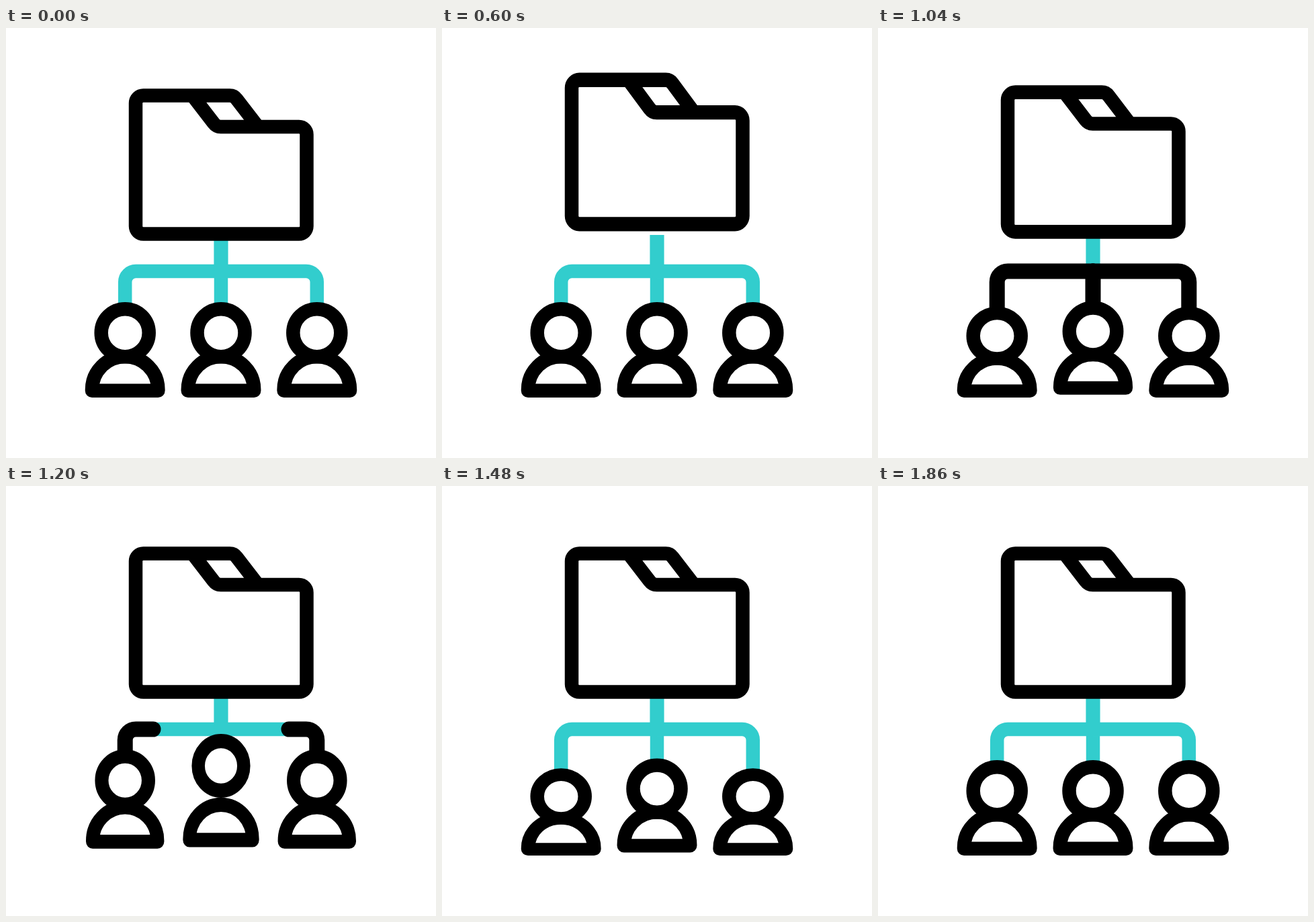
These frames come from a looping animation (640 by 640 pixels, 1960 ms). An HTML page:

```html
<!DOCTYPE html>
<html lang="en">
<head>
<meta charset="utf-8">
<title>Shared folder</title>
<style>
  html, body { margin: 0; height: 100%; overflow: hidden; background: #fff; }
  svg { display: block; width: 100vw; height: 100vh; }
  path, circle { fill: none; stroke: #000; stroke-width: 20.5; stroke-linejoin: round; }
  .wires path { stroke: #32cdcd; }
  .pulse path { stroke-width: 23; stroke-linecap: round; }
  .folder { stroke-linecap: round; }
  .person * { fill: #fff; }
</style>
</head>
<body>
<svg viewBox="0 0 640 640">
  <g class="wires"></g>
  <path class="folder" d="M277.4 100.5L309 141.5Q313.2 147 319.5 147H436a11.5 11.5 0 0 1 11.5 11.5V295a11.5 11.5 0 0 1-11.5 11.5H204.5a11.5 11.5 0 0 1-11.5-11.5V112a11.5 11.5 0 0 1 11.5-11.5H333Q339.4 100.5 343 105.5L375 147"/>
  <g class="pulse"></g>
  <g class="people"></g>
</svg>
<script>
const LOOP = 1960, MIDDLE = 320, SPACING = 142.8;
const FLOOR = 550, FOLDER_BASE = 306, WIRE_LENGTH = 250;
const SIDES = [-1, 0, 1];
const $ = selector => document.querySelector(selector);

function wire(side) {
  const x = MIDDLE + side * SPACING;
  const bend = side ? `V362H${x - side * 16}a16 16 0 0 ${side > 0 ? 1 : 0} ${side * 16} 16` : '';
  return `<path d="M${MIDDLE} 308${bend}V424"/>`;
}
$('.wires').innerHTML = $('.pulse').innerHTML = SIDES.map(wire).join('');

// Each person stands on the origin of its own group.
$('.people').innerHTML = SIDES.map(() => `<g class="person">
  <path d="M-49.2-10.3v-1.5a49.2 49.2 0 0 1 98.4 0v1.5z"/><circle cy="-96.3" r="35.5"/></g>`).join('');
const people = [...$('.people').children];

function ease(t, from, to) {
  const x = Math.min(1, Math.max(0, (t - from) / (to - from)));
  return x * x * (3 - 2 * x);
}
const bump = (t, from, peak, to) => ease(t, from, peak) - ease(t, peak, to);

// Crouch, leap, land flat, then one small rebound.
function hop(t, height) {
  return {
    lift: height * bump(t, 140, 300, 450) + 6 * bump(t, 520, 685, 885),
    tall: 1 - .07 * bump(t, 0, 115, 230) + .05 * bump(t, 200, 310, 430)
            - .088 * bump(t, 430, 515, 680) + .015 * bump(t, 600, 690, 890)
  };
}

function draw(t) {
  const { lift, tall } = hop(t - 260, 18);
  $('.folder').setAttribute('transform',
    `translate(0 ${FOLDER_BASE - lift}) scale(1 ${tall}) translate(0 ${-FOLDER_BASE})`);

  const front = WIRE_LENGTH * ease(t, 693, 970);
  const tail = WIRE_LENGTH * ease(t, 870, 1440);
  const pulse = $('.pulse').style;
  pulse.visibility = front > tail ? 'visible' : 'hidden';
  pulse.strokeDasharray = `${front - tail} 999`;
  pulse.strokeDashoffset = -tail;

  people.forEach((person, i) => {
    const side = SIDES[i], time = t - (side ? 970 : 850);
    const { lift, tall } = hop(time, 17);
    const wide = 1 - .05 * bump(time, 150, 330, 480);
    const toss = 22 * bump(time, 190, 335, 480);
    person.setAttribute('transform',
      `translate(${MIDDLE + side * SPACING} ${FLOOR - lift}) scale(${wide} ${tall})`);
    person.lastElementChild.setAttribute('transform', `translate(0 ${-toss / tall})`);
  });
}

const begin = performance.now();
function tick() {
  draw((performance.now() - begin) % LOOP);
  requestAnimationFrame(tick);
}
tick();
</script>
</body>
</html>
```
